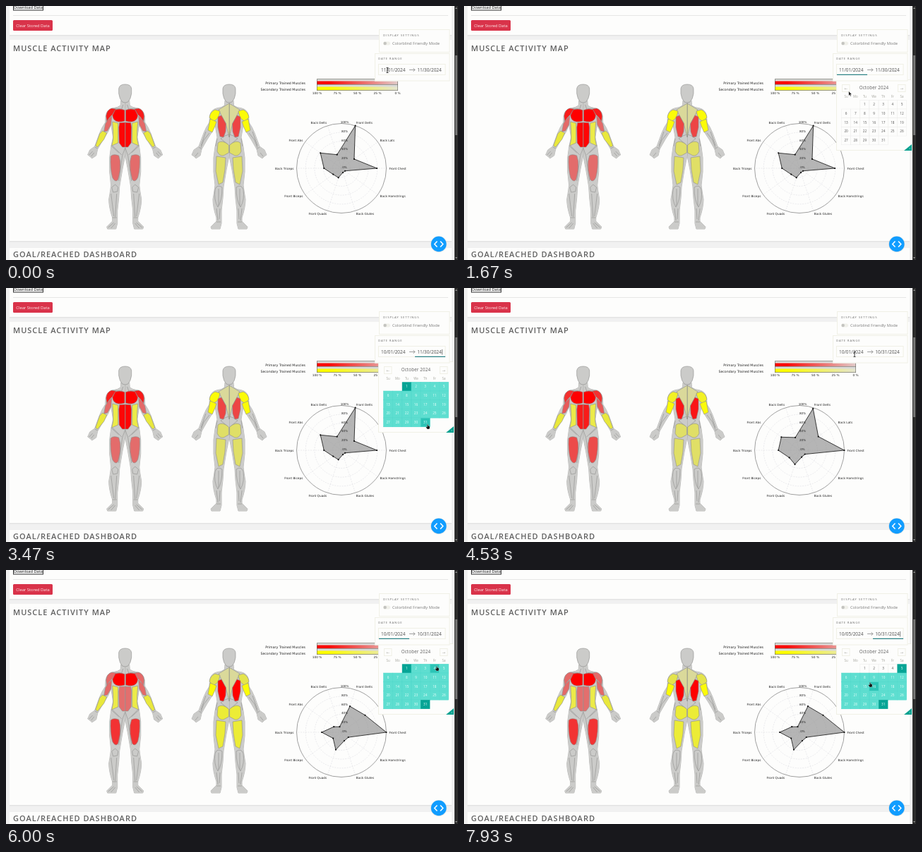
Recreate the animation shown at these times as an HTML page with a canvas. Size 640 by 360 pixels, loop 8 s.

```html
<!DOCTYPE html>
<html lang="en">
<head>
<meta charset="utf-8">
<title>Muscle activity map</title>
<style>
html, body { margin: 0; width: 640px; height: 360px; overflow: hidden; background: #f1f1f1; }
canvas { display: block; }
</style>
</head>
<body>
<canvas id="stage" width="640" height="360"></canvas>
<script>
const c = document.getElementById('stage').getContext('2d');
const LOOP = 8000, TAU = Math.PI * 2;
const UI = '"Open Sans", sans-serif', PLOT = '"DejaVu Sans", sans-serif';
const CARD = '#fdfdfc', EDGE = '#f0f0e6', SKIN = '#cbcbc9', LINE = '#8e8e8c';
const YELLOW = '#fbfb08', PALE = '#e0df66';

// Radar values follow the label order, counterclockwise from the right.
const LABELS = ['Front Chest', 'Back Lats', 'Front Delts', 'Back Delts', 'Front Abs',
  'Back Triceps', 'Front Biceps', 'Front Quads', 'Back Glutes', 'Back Hamstrings'];
const DATA = [
  { from: 0, delt: 0.5, rear: YELLOW, ham: PALE, v: [0.79, 0.35, 1, 0.32, 0.58, 0.39, 0.23, 0.22, 0.1, 0.1] },
  { from: 3870, delt: 0.42, rear: '#f2f124', ham: PALE, v: [1, 0.52, 0.98, 0.3, 0.5, 0.47, 0.28, 0.33, 0.16, 0.15] },
  { from: 5300, delt: 0.23, rear: '#e4e44c', ham: '#ecec36', v: [1, 0.65, 0.61, 0.13, 0.21, 0.44, 0.23, 0.41, 0.2, 0.19] }
];

// Cursor stops: time, x, y
const CURSOR = [[0, 540, 91], [420, 540, 91], [850, 552, 124], [930, 553, 124], [1070, 553, 124],
  [1130, 539, 122], [1300, 540, 117], [1550, 540, 117], [2000, 567, 139], [2200, 568, 140],
  [2330, 572, 143], [2700, 578, 155], [3300, 596, 192], [3470, 597, 194], [3850, 596, 192],
  [4350, 555, 98], [4530, 553, 94], [4800, 553, 94], [5600, 604, 134], [6000, 610, 137],
  [6350, 618, 139], [6650, 618, 140], [7500, 578, 158], [7930, 575, 160], [8000, 575, 160]];

const half = {
  body: 'M0 134H6L6.5 141Q10 144 18 145Q26 147 27.5 156L28 165Q33 172 36 180L43 199L50 204L53 211L50 213L47 216L41 212L39 203L31 189L24 178L20 168L17 186L20 200L22 215L22 235L20 254L21 262L23 274Q23 285 18 300L18 305L26 313L25 316H13L11 308V290L9 272L8 256L4 232L0 212Z',
  chest: 'M.7 147.5Q8 145 14 147L18 155Q17 163 10 164Q4 164.5 .7 163Z',
  delt: 'M13 146L19 145Q26 147 27 156L26 164Q22 157 18 154Z',
  bicep: 'M19 156L25 162L28 167L30 178L25 177L20 168Z',
  forearm: 'M26 180L32 177L36 181L42 198L39 200L30 189Z',
  abs: 'M0 165L8 165.5L9 172L8.5 194L4 200H0Z',
  oblique: 'M10 166L18 164L17 178L17 189L19 198L10 194Z',
  quad: 'M9 212Q17 209 20.5 213Q21.5 230 18 243Q14 251 10 246Q6 232 7 220Z',
  frontLines: 'M3 140L5 146L14 145M18 198L5 211M20 198L9 208M0 201L4 212L9 248M10 257L14 253L19 257L17 264L11 263ZM12 266L14 299M20 266L16 298M12 300H18M14 308L20 315M16 307L24 314M39 202L43 200M44 208L48 213M46 206L51 211',
  trap: 'M0 138L5 141L15 147L10 157L5 166L0 186Z',
  backDelt: 'M13 149L20 147Q27 150 28 158L22 164L15 158Z',
  tricep: 'M18 164L27 160L30 176L24 179L20 170Z',
  lat: 'M4.5 167L11 155L16 157L16 172L13 185L8 186L5 178Z',
  glute: 'M.6 197Q10 189 16 194L17 206Q14 213 8 212L.6 208Z',
  ham: 'M5 215L18 213L19 234L15 253L9 250L6 232Z',
  backLines: 'M0 182L6 184L12 188L2 196M17 188L19 199M10 257Q17 252 20 260Q22 275 16 285Q10 276 10 257M15 259V283M13 287L14 302M18 287L16 304M12 306H18M28 180L36 190L40 201M33 178L40 198M39 203L43 200M44 208L48 213'
};
for (const k in half) half[k] = new Path2D(half[k]);

function box(x, y, w, h, fill, stroke) {
  c.fillStyle = fill;
  c.fillRect(x, y, w, h);
  if (!stroke) return;
  c.strokeStyle = stroke;
  c.lineWidth = 1;
  c.strokeRect(x + 0.5, y + 0.5, w - 1, h - 1);
}

function line(points, color, width = 1) {
  c.beginPath();
  points.forEach(p => c.lineTo(...p));
  c.strokeStyle = color;
  c.lineWidth = width;
  c.stroke();
}

function shape(points, fill) {
  c.beginPath();
  points.forEach(p => c.lineTo(...p));
  c.closePath();
  c.fillStyle = fill;
  c.fill();
}

function disc(x, y, r, fill) {
  c.beginPath();
  c.arc(x, y, r, 0, TAU);
  c.fillStyle = fill;
  c.fill();
}

function text(s, x, y, size, color, { font = UI, align = 'left', weight = 400, gap = 0 } = {}) {
  c.font = `${weight} ${size}px ${font}`;
  c.letterSpacing = gap + 'px';
  c.textAlign = align;
  c.fillStyle = color;
  c.fillText(s, x, y);
  c.letterSpacing = '0px';
}

function heat(v) {
  const k = Math.min(1, (v / 0.6) ** 0.8);
  const mix = (a, b) => Math.round(a + (b - a) * k);
  return `rgb(${mix(205, 255)},${mix(196, 0)},${mix(194, 0)})`;
}

function cursorAt(t) {
  const i = CURSOR.findIndex(p => p[0] > t);
  const [t0, x0, y0] = CURSOR[i - 1], [t1, x1, y1] = CURSOR[i];
  const u = (t - t0) / (t1 - t0), k = u * u * (3 - 2 * u);
  return [x0 + (x1 - x0) * k, y0 + (y1 - y0) * k];
}

function figure(cx, muscles, lines) {
  const mirror = draw => [1, -1].forEach(side => {
    c.save();
    c.translate(cx, 0);
    c.scale(side, 1);
    draw();
    c.restore();
  });
  c.lineWidth = 0.6;
  c.strokeStyle = LINE;
  mirror(() => {
    c.fillStyle = SKIN;
    c.stroke(half.body);
    c.fill(half.body);
    c.stroke(half[lines]);
    for (const [name, fill] of muscles) {
      c.fillStyle = fill;
      c.fill(half[name]);
      c.stroke(half[name]);
    }
  });
  c.save();
  c.translate(cx, 0);
  c.fillStyle = SKIN;
  const head = new Path2D('M-9 117Q-8 111 0 111Q8 111 9 117L9 124Q8 132 4 136Q0 138 -4 136Q-8 132 -9 124Z');
  c.fill(head);
  c.stroke(head);
  c.restore();
}

function legend() {
  const bar = (y, h, from, to) => {
    const g = c.createLinearGradient(440, 0, 555, 0);
    g.addColorStop(0, from);
    g.addColorStop(0.15, from);
    g.addColorStop(1, to);
    c.fillStyle = g;
    c.fillRect(440, y, 115, h);
  };
  const label = { font: PLOT, align: 'right' };
  text('Primary Trained Muscles', 424, 110.5, 4.7, '#222', label);
  text('Secondary Trained Muscles', 424, 119.8, 4.7, '#222', label);
  box(440, 103.5, 115, 16.5, '#dadad8');
  bar(106.5, 4.5, '#fa0a08', '#e2cdcb');
  bar(114.5, 5, '#fcfc00', '#e4e4d2');
  c.strokeStyle = '#66665e';
  c.lineWidth = 0.6;
  c.strokeRect(440.3, 103.7, 114.4, 16);
  line([[440, 111.4], [555, 111.4]], '#66665e', 0.6);
  for (let i = 0; i < 5; i++) {
    text(`${100 - i * 25} %`, 440.5 + i * 28.5, 125, 4.3, '#222', { font: PLOT, align: 'center' });
  }
}

function radar(values) {
  const cx = 475, cy = 230, R = 63.5;
  const at = (i, r) => [cx + r * Math.cos(i * TAU / 10), cy - r * Math.sin(i * TAU / 10)];
  c.setLineDash([2, 1.5]);
  for (let i = 0; i < 10; i++) line([[cx, cy], at(i, R)], '#dedee2', 0.6);
  for (let k = 1; k < 5; k++) {
    c.beginPath();
    c.arc(cx, cy, R * k / 5, 0, TAU);
    c.stroke();
  }
  c.setLineDash([]);
  c.beginPath();
  c.arc(cx, cy, R, 0, TAU);
  c.strokeStyle = '#777';
  c.lineWidth = 0.7;
  c.stroke();

  const pts = values.map((v, i) => at(i, v * R));
  shape(pts, 'rgba(148,148,148,.68)');
  c.strokeStyle = '#252525';
  c.lineWidth = 0.9;
  c.stroke();
  pts.forEach(p => disc(...p, 1.1, '#111'));

  for (let k = 0; k < 6; k++) {
    text(k * 20 + '%', 479.5, 229.6 - k * 12.7, 4.1, '#222', { font: PLOT, align: 'center' });
  }
  LABELS.forEach((s, i) => {
    const [x, y] = at(i, 67.5);
    text(s, x, y + 1.6, 4.25, '#222', { font: PLOT, align: x > cx ? 'left' : 'right' });
  });
}

function page() {
  box(0, 0, 640, 360, '#f1f1f1');
  box(5, -5, 626, 46, CARD);
  box(5, 48, 626, 285, CARD);
  box(5, 343, 626, 30, CARD);
  box(5, 41, 626, 1.5, '#e3e3e3');
  box(5, 333, 626, 1.5, '#e3e3e3');
  box(10, -6, 43, 12.5, '#f3f3f3', '#3a3a3a');
  text('Download Data', 31.5, 3.6, 5.7, '#222', { align: 'center' });
  line([[10, 13.5], [626, 13.5]], '#e6e6e6');
  c.beginPath();
  c.roundRect(10, 20, 56, 15, 1.5);
  c.fillStyle = '#d9334a';
  c.fill();
  text('Clear Stored Data', 38, 29.8, 5.8, '#fff0f0', { align: 'center' });
  const title = { weight: 600, gap: 1 };
  text('MUSCLE ACTIVITY MAP', 10, 64, 11, '#606060', title);
  text('GOAL/REACHED DASHBOARD', 10, 356, 11, '#606060', title);
}

function scrollbar() {
  box(635, 0, 5, 360, '#2c2c2c');
  box(636, 70, 3, 113, '#757575');
  shape([[636, 4], [639, 4], [637.5, 2]], '#999');
  shape([[636, 356], [639, 356], [637.5, 358]], '#999');
}

function calendar(month, start, end, tip) {
  const W = 13.15, H = 12.7, X = 534.5, Y = 133.3;
  const [name, first, days] = month === 10 ? ['October', 2, 31] : ['November', 5, 30];
  const mid = { align: 'center' };
  box(527, 104, 107.5, 101, CARD, EDGE);
  text(name + ' 2024', 580.5, 118.2, 6.2, '#5c5c5c', { ...mid, gap: 0.2 });
  [[535, '←'], [614, '→']].forEach(([x, arrow]) => {
    box(x, 111, 11.5, 11, CARD, EDGE);
    text(arrow, x + 5.7, 118.5, 5.5, '#b0b0ac', { ...mid, font: PLOT });
  });
  ['Su', 'Mo', 'Tu', 'We', 'Th', 'Fr', 'Sa'].forEach((d, i) =>
    text(d, X + W * (i + 0.5), 130, 4.4, '#a2a29a', mid));
  for (let d = 1; d <= days; d++) {
    const n = first + d - 1, x = X + n % 7 * W, y = Y + Math.floor(n / 7) * H;
    const key = month * 100 + d, picked = key === start || key === end;
    const inside = key > start && key < end;
    const hover = tip[0] >= x && tip[0] < x + W && tip[1] >= y && tip[1] < y + H;
    const fill = picked ? '#06a495' : inside ? (hover ? '#2cc4b6' : '#5eded0') : hover ? '#e4e7e7' : CARD;
    c.fillStyle = fill;
    c.fillRect(x, y, W + 0.1, H + 0.1);
    if (!picked) {
      c.strokeStyle = inside ? '#4dd8ca' : '#ececea';
      c.lineWidth = 0.5;
      c.strokeRect(x, y, W, H);
    }
    text(d, x + W / 2, y + 8, 4.7, picked || inside ? '#eafffb' : '#555', mid);
  }
  shape([[634, 196], [634, 205], [623, 205]], '#06a08f');
  text('?', 631, 203.8, 4, '#e4fffa', mid);
}

function settings(s) {
  const small = { gap: 0.9 };
  box(528, 33, 100.5, 33, CARD, EDGE);
  text('DISPLAY SETTINGS', 534, 43, 4.3, '#6c6c6c', small);
  c.beginPath();
  c.roundRect(534, 50.5, 10, 5, 2.5);
  c.fillStyle = '#f0f0ea';
  c.fill();
  disc(536.7, 53, 2.2, '#c4c4c0');
  text('Colorblind Friendly Mode', 547, 55.2, 5.7, '#7c7c7c');
  box(522, 67, 106.5, 39.5, CARD, EDGE);
  text('DATE RANGE', 527, 76, 4.3, '#6c6c6c', small);
  box(527, 82, 95.5, 16, CARD, EDGE);
  const show = n => `${Math.floor(n / 100)}/${String(n % 100).padStart(2, '0')}/2024`;
  text(show(s.start), 531, 92.8, 6.5, '#4c4c4c');
  text(show(s.end), 582.3, 92.8, 6.5, '#4c4c4c');
  line([[571, 90.5], [579, 90.5]], '#777', 0.7);
  line([[576.5, 88], [579, 90.5], [576.5, 93]], '#777', 0.7);
  if (!s.open) return;
  const x = s.focus ? 579 : 528;
  line([[x, 97.4], [x + 43, 97.4]], '#2c8286', 1.1);
  if (s.focus) line([[617.5, 87], [617.5, 94.5]], '#333', 0.6);
}

function debugButton() {
  disc(612.7, 337.6, 11.5, 'rgba(110,110,110,.16)');
  disc(612.7, 337.4, 10.8, '#119dff');
  line([[610.5, 333.4], [606.7, 337.4], [610.5, 341.4]], '#fff', 1.5);
  line([[615, 333.4], [618.8, 337.4], [615, 341.4]], '#fff', 1.5);
}

function pointer([x, y], open) {
  if (y < 100 && y > 82) {
    line([[x - 1.5, y - 3.5], [x + 1.5, y - 3.5]], '#222', 0.8);
    line([[x, y - 3.5], [x, y + 3.5]], '#222', 0.9);
    line([[x - 1.5, y + 3.5], [x + 1.5, y + 3.5]], '#222', 0.8);
    return;
  }
  const hand = open && y > 133 && y < 197;
  const p = new Path2D(hand
    ? 'M-.6 -.8L.5 -.8L.7 1.3L3 2L3 4.5L2.3 6L-.6 6L-2.4 3.2L-1.8 2.5L-.6 3Z'
    : 'M0 0L0 6L1.4 4.8L2.4 7L3.3 6.6L2.3 4.4L4.2 4.3Z');
  c.save();
  c.translate(x, y);
  c.fillStyle = '#111';
  c.fill(p);
  c.strokeStyle = '#f4f4f4';
  c.lineWidth = 0.3;
  c.stroke(p);
  c.restore();
}

function render(now) {
  const t = now % LOOP, tip = cursorAt(t);
  const state = {
    open: t >= 350 && t < 3800 || t >= 4730,
    month: t < 1450 ? 11 : 10,
    start: t < 2130 ? 1101 : t < 6530 ? 1001 : 1005,
    end: t < 3760 ? 1130 : 1031,
    focus: t >= 2130 && t < 3800 || t >= 6530
  };
  const data = DATA.filter(d => d.from <= t).pop(), v = data.v;
  page();
  figure(168.7, [['delt', heat(data.delt)], ['bicep', heat(v[6])], ['forearm', '#e9e83c'],
    ['oblique', '#eceb48'], ['chest', heat(v[0])], ['abs', heat(v[4])], ['quad', heat(v[7])]], 'frontLines');
  figure(316, [['trap', '#dad99a'], ['backDelt', data.rear], ['tricep', YELLOW], ['lat', heat(v[1])],
    ['glute', data.ham], ['ham', data.ham]], 'backLines');
  legend();
  radar(v);
  if (state.open) calendar(state.month, state.start, state.end, tip);
  settings(state);
  scrollbar();
  debugButton();
  pointer(tip, state.open);
  requestAnimationFrame(() => render(performance.now()));
}
render(performance.now());
</script>
</body>
</html>
```
